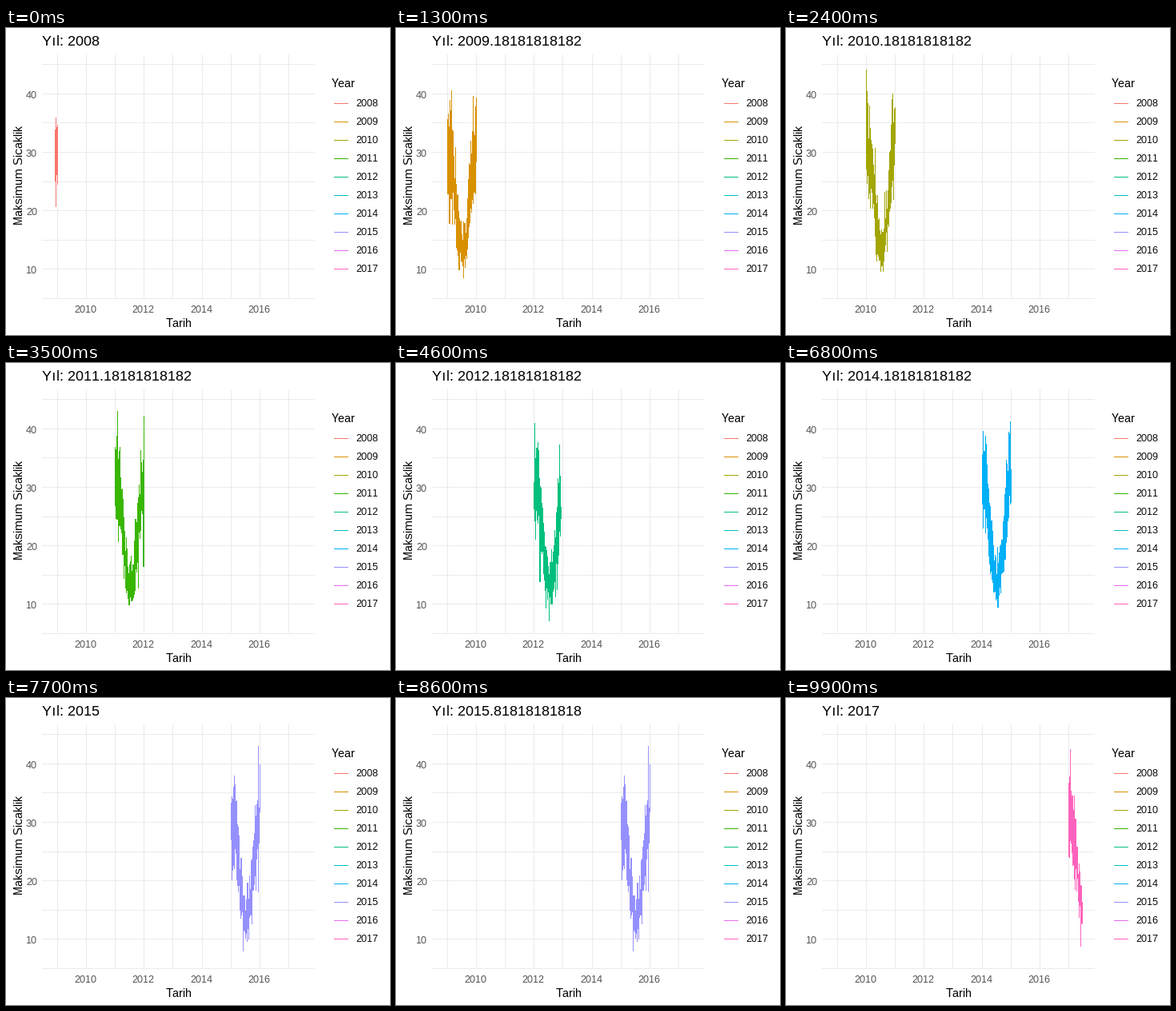
Write a matplotlib script that moves like this. It is 480 px wide and 384 px high and loops after 10000 ms.

```python
import numpy as np
import matplotlib.pyplot as plt
from matplotlib.animation import FuncAnimation

plt.rcParams.update({
    "font.family": "Liberation Sans",
    "text.hinting": "native",
    "text.hinting_factor": 1,
    "text.kerning_factor": 6,
    "path.simplify": False,
})

W, H, DPI = 480, 384, 96
PT = 72 / DPI
FIRST, LAST, STEPS = 2008, 2017, 11
GRID, TICK = "#EBEBEB", "#4D4D4D"
COLORS = ["#F8766D", "#D89000", "#A3A500", "#39B600", "#00BF7D",
          "#00BFC4", "#00B0F6", "#9590FF", "#E76BF3", "#FF62BC"]
SPAN = {2008: (0.917, 1), 2012: (0, 0.92), 2017: (0, 0.475)}  # partial years


def px_x(t):
    return 99.9 + 36.18 * (t - 2010)


def px_y(temp):
    return 374.6 - 7.32 * temp


def series(year):
    """Pixel path of daily maxima: a seasonal wave plus seeded weather."""
    rng = np.random.default_rng(year)
    start, end = SPAN.get(year, (0, 1))
    f = np.arange(round(start * 365), round(end * 365) + 1) / 365
    warmth = (1 + np.cos(2 * np.pi * (f - 0.03))) / 2
    weather = rng.normal(size=f.size)
    weather[1:] += 0.3 * weather[:-1]
    temp = 13.3 + 17.8 * warmth + (1.9 + 2.3 * warmth) * weather
    return np.rint(px_x(year + f)), np.rint(px_y(temp.clip(7, 44.5)))


fig = plt.figure(figsize=(W / DPI, H / DPI), dpi=DPI, facecolor="white")
ax = fig.add_axes([0, 0, 1, 1])
# Whole numbers are pixel centres
ax.set_xlim(-0.5, W - 0.5)
ax.set_ylim(H - 0.5, -0.5)
ax.axis("off")


def stroke(x, y, color):
    return ax.plot(x, y, color=color, lw=PT, antialiased=False, snap=False,
                   solid_capstyle="butt", solid_joinstyle="bevel")[0]


def label(x, y, s, size, color="black", **kw):
    return ax.text(x, y, s, fontsize=size * PT, color=color, va="baseline", **kw)


for year in range(2009, 2018):
    x = round(px_x(year))
    stroke([x, x], [32.5, 338.5], GRID)
    if year % 2 == 0:
        label(x - 1, 355.5, str(year), 12, TICK, ha="center")

for temp in range(5, 50, 5):
    y = round(px_y(temp))
    stroke([44.5, 385.5], [y, y], GRID)
    if temp % 10 == 0:
        label(24.5, y + 5.5, str(temp), 12, TICK)

label(216, 373.5, "Tarih", 15.1, ha="center")
label(20.5, 183.5, "Maksimum Sicaklik", 15.1, ha="center",
      rotation=90, rotation_mode="anchor")

label(406.5, 73.5, "Year", 15.1)
for k, color in enumerate(COLORS):
    y = round(93.8 + 23.04 * k)
    stroke([409.5, 427.5], [y, y], color)
    label(436.5, y + 3.5, str(FIRST + k), 12)

title = label(44.5, 21.5, "", 18)
line = stroke([], [], COLORS[0])
paths = [series(year) for year in range(FIRST, LAST + 1)]


def update(i):
    k = i // STEPS
    title.set_text(f"Yıl: {FIRST + i / STEPS:.15g}")
    line.set_data(*paths[k])
    line.set_color(COLORS[k])
    return title, line


anim = FuncAnimation(fig, update, frames=(LAST - FIRST) * STEPS + 1,
                     interval=100, repeat=True, repeat_delay=0)
plt.show()
```
